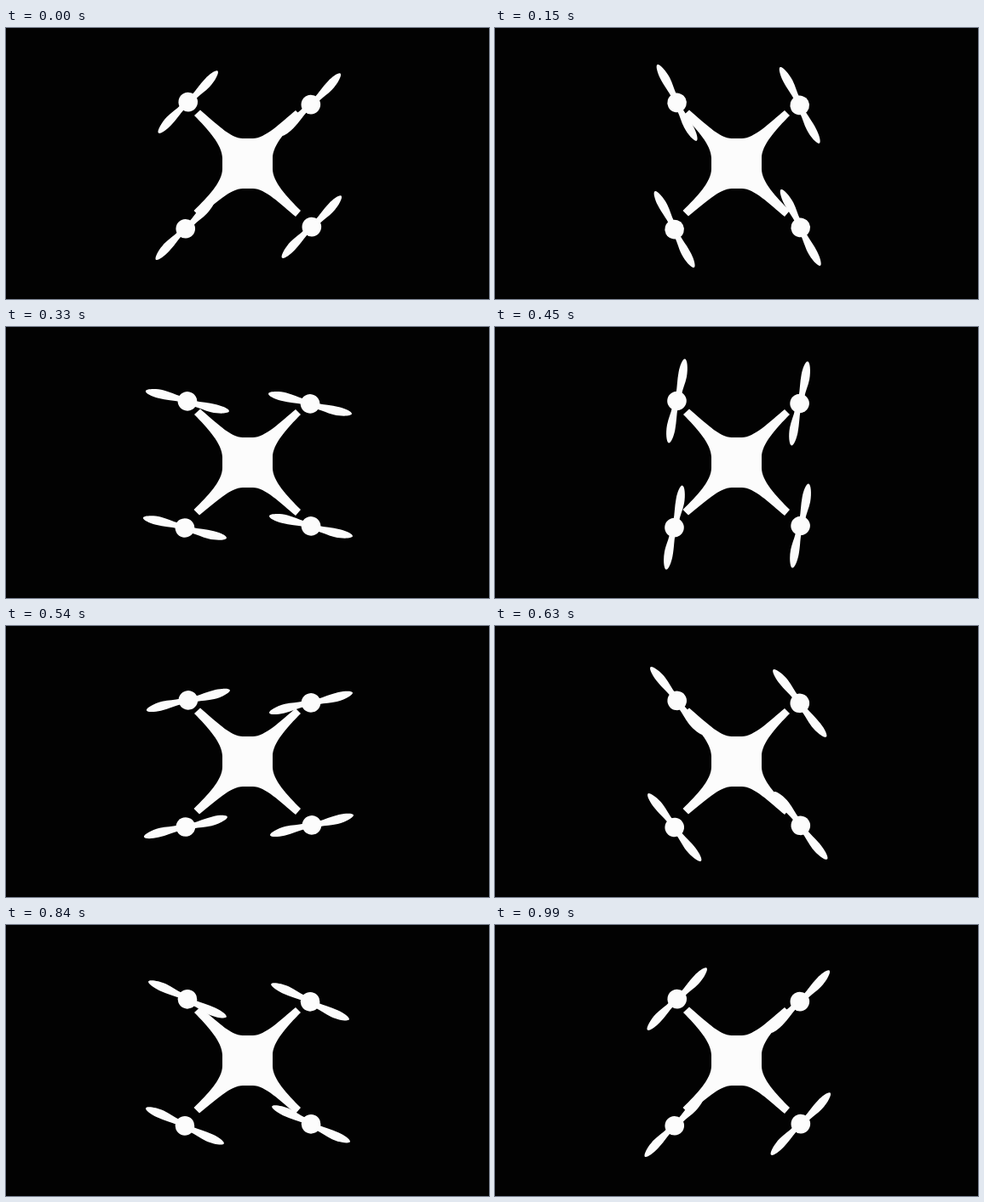
Animation of 567 by 319 pixels, one loop 1.02 s. Source, as an HTML page:

```html
<!DOCTYPE html>
<html lang="en">
<head>
<meta charset="utf-8">
<title>Drone</title>
<style>
  html, body { margin: 0; height: 100%; overflow: hidden; background: #020202; }
  svg { display: block; width: 100%; height: 100%; fill: #fcfcfc; }
</style>
</head>
<body>
<svg viewBox="0 0 567 319">
  <defs>
    <path id="blade" d="M8 -2.6C16 -2.6 24 -4.3 34 -4.3C42 -4.3 50.4 -2.4 50.4 0.2C50.4 2.8 40 6 30 6C22 6 16 4 8 4Z"/>
    <g id="rotor">
      <circle r="11.3"/>
      <use href="#blade"/>
      <use href="#blade" transform="rotate(180)"/>
    </g>
  </defs>
  <path d="M228 96.5C246 112 264 130 278 130H290C304 130 322 112 340 97L346 103
    C330 119 313 138 313 153V166C313 181 330 199 346 215L340 222
    C322 207 304 189 290 189H278C264 189 246 206 227 221.500L220.500 215
    C237 199 254 181 254 166V153C254 138 237 119 221 103Z"/>
</svg>
<script>
  const LOOP = 1020, STEP = 30, LAST = LOOP / STEP - 1;
  const START = -46.5, TURN = 720;
  const hubs = [[213.4, 87.5], [357.5, 90.5], [210.4, 236.6], [358.5, 234.5]];

  const svg = document.querySelector('svg');
  const rotors = hubs.map(() => {
    const use = document.createElementNS(svg.namespaceURI, 'use');
    use.setAttribute('href', '#rotor');
    return svg.appendChild(use);
  });

  function draw(now) {
    const step = Math.floor(now % LOOP / STEP);
    const angle = START + TURN * step / LAST;
    // The pivot sits slightly off the hub centre.
    rotors.forEach((rotor, i) => rotor.setAttribute('transform',
      `translate(${hubs[i]}) rotate(${angle}) translate(0.5 0)`));
    requestAnimationFrame(draw);
  }
  draw(0);
</script>
</body>
</html>
```
